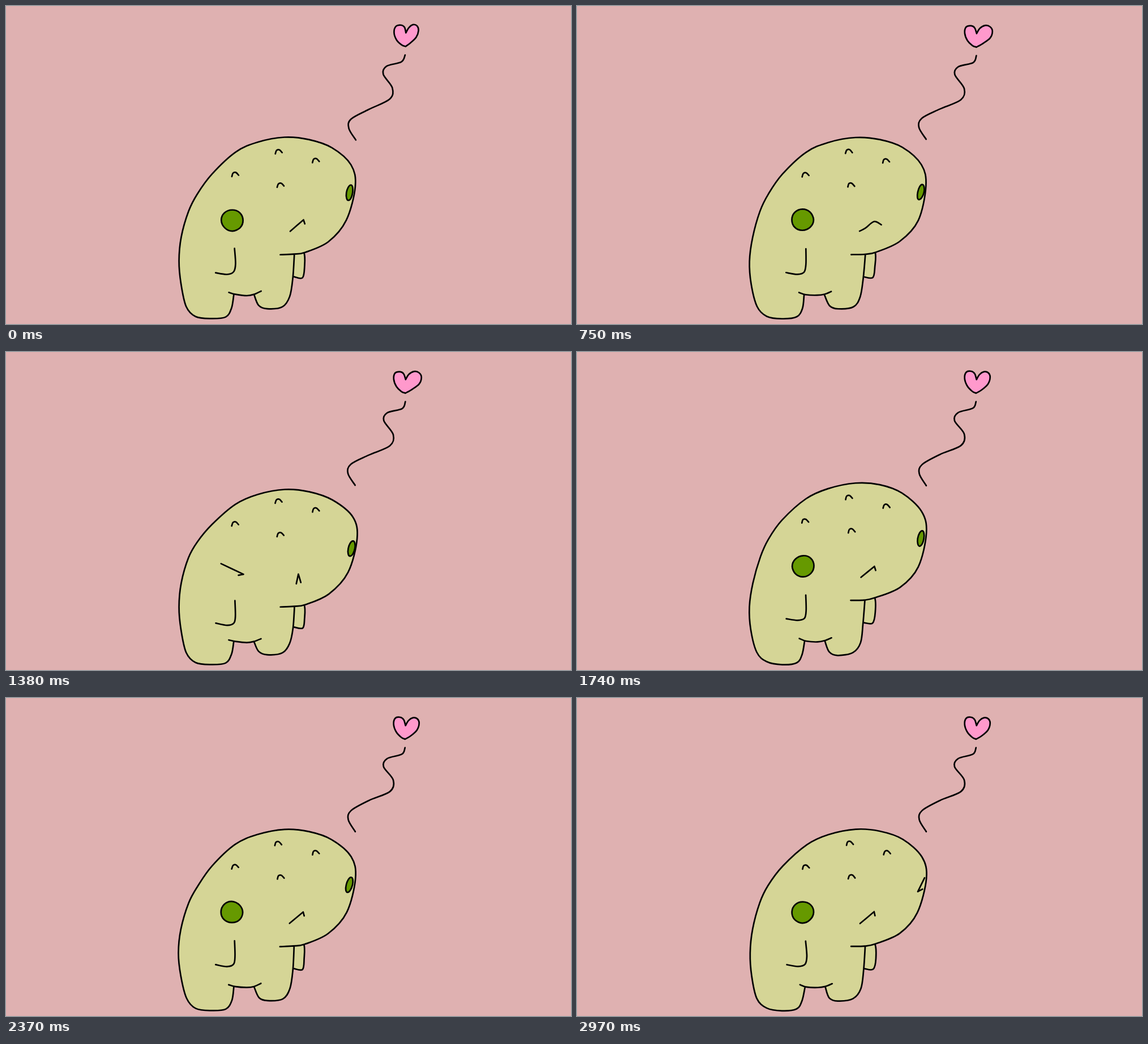
Write an HTML page with a canvas that moves like this. It is 998 px wide and 561 px high and loops after 3 s.

```html
<!DOCTYPE html>
<html lang="en">
<head>
<meta charset="utf-8">
<title>Little blob in love</title>
<style>
html, body { margin: 0; width: 100%; height: 100%; overflow: hidden; background: #dfb1b1; }
canvas { display: block; }
</style>
</head>
<body>
<canvas id="stage" width="998" height="561"></canvas>
<script>
const ctx = document.getElementById('stage').getContext('2d');
const SKIN = '#d5d596', GREEN = '#669900', PINK = '#ff99cc', BACK = '#dfb1b1';
const STEP = 30, STEPS = 100, HOLD = 3;

const clamp = v => Math.max(0, Math.min(1, v));
const phase = seed => {
  const v = Math.sin(seed * 12.9898) * 43758.5453;
  return (v - Math.floor(v)) * 2 * Math.PI;
};

// "x,y x,y / x,y ..." becomes a list of point lists, split at hard corners
const parse = text => text.split('/').map(part =>
  part.trim().split(' ').map(s => s.split(',').map(Number)));

// Line boil: a small smooth displacement that differs with each seed
function boil(seed) {
  const [a, b, c, d] = [1, 2, 3, 4].map(i => phase(seed * 4 + i));
  return ([x, y]) => [
    x + 0.7 * Math.sin(y * 0.03 + a) + 0.4 * Math.sin(y * 0.13 + b),
    y + 0.7 * Math.sin(x * 0.03 + c) + 0.4 * Math.sin(x * 0.13 + d)
  ];
}

// Crouching lowers the head and leaves the feet and the lower back in place
const sink = ([x, y]) => [
  x + Math.max(0, x - 560) * 0.06,
  y + 11 * clamp((520 - y) / 60) * clamp((x - 320) / 60)
];

// Catmull-Rom curve through the points; equal ends make a smooth ring
function curve(path, p, join) {
  const last = p.length - 1;
  const ring = last > 2 && p[0].join() === p[last].join();
  const at = i => i < 0 ? p[ring ? last - 1 : 0] : i > last ? p[ring ? 1 : last] : p[i];
  if (join) path.lineTo(...p[0]); else path.moveTo(...p[0]);
  for (let i = 0; i < last; i++) {
    const [a, b, c, d] = [at(i - 1), at(i), at(i + 1), at(i + 2)];
    path.bezierCurveTo(
      b[0] + (c[0] - a[0]) / 6, b[1] + (c[1] - a[1]) / 6,
      c[0] - (d[0] - b[0]) / 6, c[1] - (d[1] - b[1]) / 6, c[0], c[1]);
  }
}

function draw(parts, warp, fill) {
  const line = new Path2D(), area = new Path2D();
  parts.forEach((part, i) => {
    const p = part.map(warp);
    curve(line, p, false);
    curve(area, p, i > 0);
  });
  if (fill) { ctx.fillStyle = fill; ctx.fill(area); }
  ctx.stroke(line);
}

function oval(cx, cy, rx, ry, lean) {
  const ring = [];
  for (let i = 0; i < 8; i++) {
    const a = i * Math.PI / 4, dy = ry * Math.sin(a);
    ring.push([cx + rx * Math.cos(a) - lean * dy, cy + dy]);
  }
  return [[...ring, ring[0]]];
}

const horn = (x, y) => [[[x - 6, y + 7], [x - 4, y + 1], [x + 1, y], [x + 6, y + 5]]];

const trunk = parse(
  '484,439 508,438 528,434 570,415 602,378 617,318 609,280 575,249 535,235 492,232 444,241 405,258 ' +
  '363,296 338,331 323,362 310,408 305,450 308,490 318,530 335,547 362,551 388,548 398,533 402,510' +
  '/393,505 405,509 425,511 438,509 450,504' +
  '/438,510 446,529 461,535 488,531 501,513 506,480 509,438');
const backArm = parse('510,425 526,434 527,460 523,479 508,478');
const arm = parse('404,428 405,455 402,469 390,473 370,470');
const hornSpots = parse('481,254 547,269 404,294 485,313')[0];

const mouths = {
  frown: parse('501,398 525,378/525,378 527,385'),
  wide: parse('500,397 510,392 525,380 538,386'),
  gasp: parse('513,397 517,380/517,380 521,395')
};
const leftWink = parse('380,363 420,381/420,381 411,383');
const rightWink = parse('613,317 602,341/602,341 610,337');
const trail = parse('705,87 699,99 673,107 667,121 683,145 678,165 640,182 609,199 605,215 617,236');

function drawBody(warp, crouch) {
  draw(backArm, warp, SKIN);
  draw(trunk, warp, SKIN);
  draw(arm, warp);
  hornSpots.forEach(([x, y]) => draw(horn(x, crouch ? y - 5 : y), warp));
}

function drawFace(warp, crouch, wink, wide) {
  if (crouch) draw(leftWink, warp);
  else draw(oval(399, 377.5, 19.2, 18.7, 0), warp, GREEN);
  if (wink) draw(rightWink, warp);
  else draw(oval(607, crouch ? 336 : 329, 5.5, 13.5, 0.2), warp, GREEN);
  draw(mouths[crouch ? 'gasp' : wide ? 'wide' : 'frown'], warp);
}

// The right lobe springs out, then shrinks back over the cycle
function drawLove(k) {
  const warp = boil(k + 50), reach = 22 + (7 - k) % 7;
  const lobe = [[0.4, 66], [0.85, 56], [1, 44], [0.87, 36], [0.55, 34], [0.22, 39], [0, 48]]
    .map(([f, y]) => [706 + f * reach, y]);
  const left = parse('706,48 703,38 697,34 688,36 685,47 690,60 699,69 706,72');
  draw([...left, [[706, 72], ...lobe]], warp, PINK);
  draw(trail, warp);
}

function render() {
  const n = Math.floor(performance.now() / STEP) % STEPS;
  // Each layer holds a drawing for three steps, staggered by one step
  const slot = shift => Math.floor((n + shift) / HOLD);
  const crouch = n >= 41 && n < 53, wink = n >= 86;
  const posed = seed => {
    const wobble = boil(seed);
    return p => wobble(crouch ? sink(p) : p);
  };
  ctx.fillStyle = BACK;
  ctx.fillRect(0, 0, 998, 561);
  ctx.strokeStyle = '#000';
  ctx.lineWidth = 2.7;
  ctx.lineCap = ctx.lineJoin = 'round';
  drawBody(posed(slot(1) % 15), crouch);
  drawFace(posed(slot(2) + 20), crouch, wink, slot(2) % 10 === 9);
  drawLove(slot(0) % 7);
  requestAnimationFrame(render);
}
render();
</script>
</body>
</html>
```
